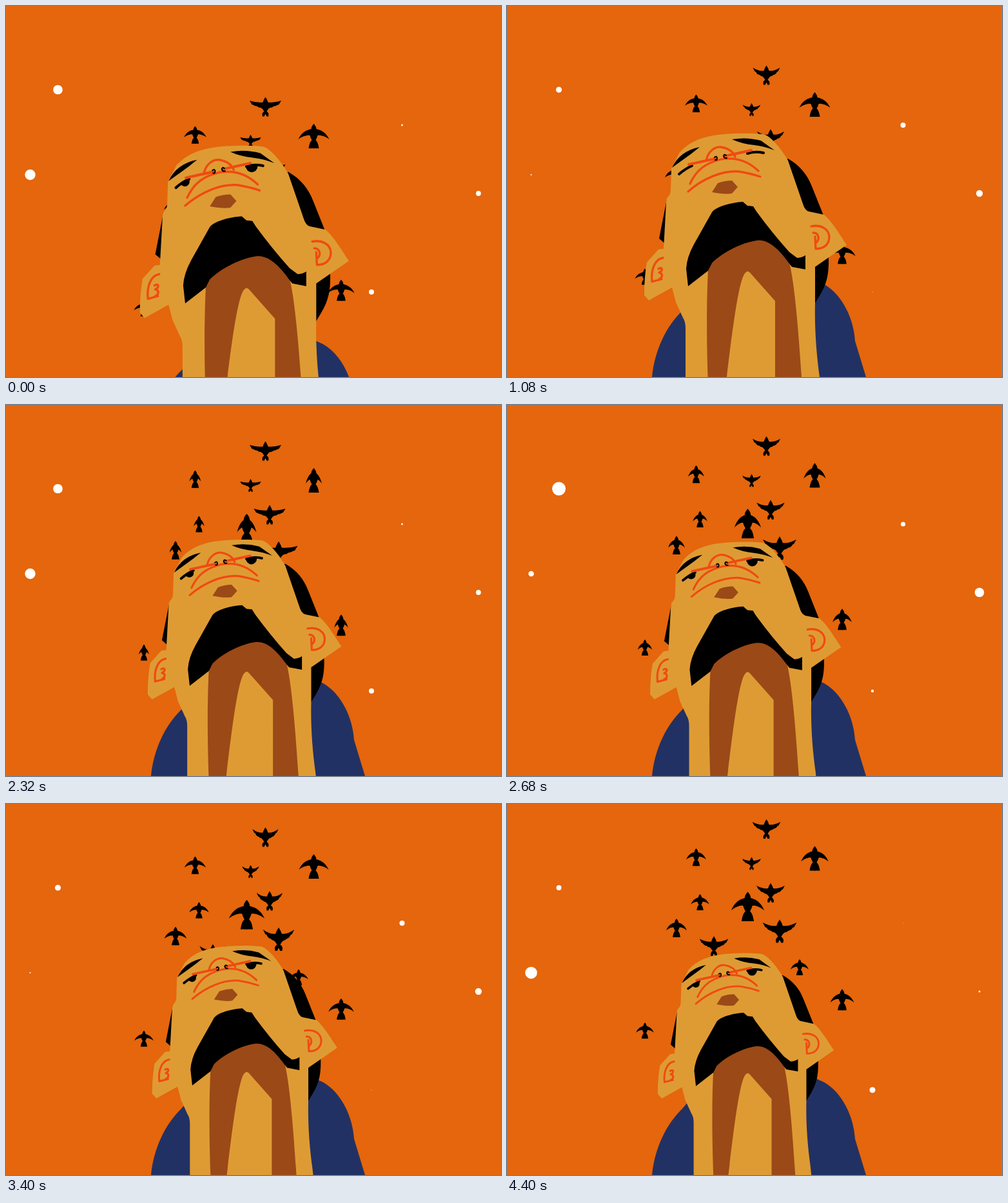
Animation of 768 by 576 pixels, one loop 4440 ms. Source, as an HTML page with a canvas:

```html
<!DOCTYPE html>
<html lang="en">
<head>
<meta charset="utf-8">
<title>Birds above</title>
<style>
html, body { margin: 0; width: 100%; height: 100%; overflow: hidden; background: #e5660c; }
canvas { display: block; }
</style>
</head>
<body>
<canvas id="stage" width="768" height="576"></canvas>
<script>
const ctx = document.getElementById('stage').getContext('2d');
const LOOP = 4440, STEP = 40;
const SKIN = '#de9b34', SHADE = '#9b4917', RED = '#f04a10', NAVY = '#223163';

// x, y, mean radius, swing, time of the largest size
const stars = [
  [80.5, 130, 5.4, 5.2, 440], [37.5, 262, 4.9, 4.4, 2050], [614.5, 185, 2.5, 2.3, 760],
  [733, 291, 4.1, 4, 600], [567, 444, 2.4, 2.1, 2070]
];

// kind, x, starting top, scale, climb rate
const birds = [
  ['hawk', 402.5, 141.5, 1, 1], ['hawk', 379.5, 200, .66, 1], ['hawk', 409, 240.5, 1, 1],
  ['hawk', 423, 297, 1.2, 1], ['hawk', 321, 323, 1.02, 1],
  ['swift', 293.5, 186.5, .72, 1], ['swift', 477.5, 183, 1, 1], ['swift', 373.5, 254, 1.2, 1],
  ['swift', 263, 298, .75, 1.02], ['swift', 299.5, 257.5, .66, 1],
  ['swift', 214, 457, .65, 1], ['swift', 520, 425, .86, 1.17], ['swift', 454, 388, .65, 1.25]
];

// Wing beats counted at a few moments
const beatTimes = [0, 1080, 1760, 2320, 3000, 3840, 4400];
const beats = {
  swift: [-.11, 2.89, 4.87, 6.5, 8, 10.4, 11.81],
  hawk: [.08, 3.27, 5.23, 6.92, 8.5, 11, 12.23]
};

// Right half of each bird, for half wingspan w
const halfBird = {
  swift: w => `M-1 2L0 0C2 2 4 5 4 8C${.42 * w} 9 ${.8 * w} 13 ${w} 24
    C${.75 * w} 19 ${.4 * w} 17 6 18Q5 22 3 25C6 28 7 32 8 38H-1Z`,
  hawk: w => {
    const tip = 1 + (w - 18) * .7;
    return `M-1 2L0 0L2.5 4L4 8Q${.55 * w} 9 ${w} ${tip}L${.85 * w} ${tip + 6}
      L${.78 * w} ${tip + 6.5}Q${.68 * w} 14 ${.5 * w} 14.5L${.42 * w} 16Q6 16 4 19L2 22
      Q5 24 5 27L4.5 30H2L0 26H-1Z`;
  }
};

const body = new Path2D(`M225 576C229 535 247 497 272 473L300 440L470 422L492 432
  C520 448 538 485 540 520L557 576V700H225Z`);
const hair = new Path2D(`M436 237C455 248 466 262 473 280L491 325L499 390
  C500 425 493 438 477 463L430 420V240Z M248 300L236 361L244 368L260 330Z`);
const skin = new Path2D(`M255 252L268 227C282 212 298 205 320 201C345 197 375 197 398 199
  C410 202 428 225 436 240L459 307Q462 317 468 319L492 324C505 335 518 358 527 371L478 405
  V462C477 500 480 540 485 576L497 690H277V500Q277 490 273 484L262 460L256 437L220 457L213 449
  C213 425 215 410 217 398L235 378L243 377L247 305Q247 299 250 296Q254 292 254 285Z`);
const shade = new Path2D(`M312 410L318 390L390 345L415 360L438 398C446 430 452 500 457 576L465 690H416V458
  L377 414Q373 410 370 414C360 422 350 500 341 576L327 690H317C309 560 309 470 312 410Z
  M318 289L327 275Q338 271 349 271L358 281L349 291Q338 293 318 289Z`);
const beard = new Path2D(`M281 435L278 408Q279 390 290 370L317 322C322 311 350 305 366 304
  L373 310L382 311L387 319Q412 353 438 382L450 391Q457 391 463 387V409L442 405L438 400
  C425 382 408 362 388 364C365 367 335 382 318 399L312 411Z`);
const brows = new Path2D(`M256 251Q268 225 299 219Q287 229 274 238Z
  M349 207Q372 203 394 209L415 224Q400 218 384 216Q364 214 349 207Z`);
const lids = new Path2D('M267 261Q276 253 287 248M373 229Q385 225 398 228');
const nostrils = new Path2D('M323 239Q326 240 326 236Q325 232 322 235M341 236Q337 237 336 233Q337 229 340 232');
const lines = new Path2D(`M309 240C312 225 323 218 332 219C344 221 351 227 354 234
  M284 276C294 254 308 244 332 238Q365 232 390 256
  M281 288C305 267 335 255 360 257Q378 260 393 265
  M472 342C487 339 499 346 500 358C500 371 491 377 479 377L478 358
  M475 352C483 352 486 361 480 367
  M242 391C229 393 223 410 225 428L240 424M235 408C242 404 242 411 236 414C242 415 242 421 236 424`);
const bridge = new Path2D('M282 246L323 237M338 233L379 224');

function fill(path, color) {
  ctx.fillStyle = color;
  ctx.fill(path);
}

function stroke(path, color, width) {
  ctx.strokeStyle = color;
  ctx.lineWidth = width;
  ctx.stroke(path);
}

function beatAt(list, t) {
  let i = 0;
  while (i < list.length - 2 && t > beatTimes[i + 1]) i++;
  const part = (t - beatTimes[i]) / (beatTimes[i + 1] - beatTimes[i]);
  return Math.cos(2 * Math.PI * (list[i] + part * (list[i + 1] - list[i])));
}

function drawStars(t) {
  for (const [x, y, mean, swing, peak] of stars) {
    const r = mean + swing * Math.cos(2 * Math.PI * (t - peak) / 2320);
    const dot = new Path2D();
    dot.arc(x, y, Math.max(0, r), 0, 7);
    fill(dot, '#fff');
  }
}

function drawBirds(t) {
  const climb = 144 * (1 - Math.exp(-t / 2600));
  const half = {
    swift: new Path2D(halfBird.swift(19 + 6.5 * beatAt(beats.swift, t))),
    hawk: new Path2D(halfBird.hawk(21.5 + 3.5 * beatAt(beats.hawk, t)))
  };
  for (const [kind, x, top, size, rate] of birds) {
    ctx.save();
    ctx.translate(x, top - climb * rate);
    ctx.scale(size, size);
    fill(half[kind], '#000');
    ctx.scale(-1, 1);
    fill(half[kind], '#000');
    ctx.restore();
  }
}

function drawEyes(t) {
  const open = Math.min(1, Math.abs(t - 1080) / 140);
  for (const [x, y, r, tilt] of [[280, 251, 7.5, -.5], [381, 228, 9, 0]]) {
    const pupil = new Path2D();
    pupil.ellipse(x, y, r, r * 1.1 * open, tilt, 0, Math.PI);
    fill(pupil, '#000');
  }
  stroke(lids, '#000', 4);
}

function drawMan(t) {
  const rise = Math.max(0, 1 - t / 1000) ** 3;
  const u = (t - 1080) / 3320;
  const size = 1 - .13 * (.82 * u + .18 * u * u);

  ctx.save();
  ctx.translate(0, 93 * rise);
  fill(body, NAVY);
  ctx.restore();

  ctx.save();
  ctx.translate(374, 458 + 27.5 * rise);
  ctx.scale(size, size);
  ctx.translate(-374, -458);
  fill(hair, '#000');
  fill(skin, SKIN);
  fill(shade, SHADE);
  fill(beard, '#000');
  fill(brows, '#000');
  drawEyes(t);
  stroke(lines, RED, 3.3);
  stroke(bridge, RED, 4);
  stroke(nostrils, '#000', 2);
  ctx.restore();
}

function draw(now) {
  const t = Math.floor(now % LOOP / STEP) * STEP;
  ctx.fillStyle = '#e5660c';
  ctx.fillRect(0, 0, 768, 576);
  drawStars(t);
  drawBirds(t);
  drawMan(t);
}

ctx.lineCap = ctx.lineJoin = 'round';
const start = performance.now();
function tick() {
  draw(performance.now() - start);
  requestAnimationFrame(tick);
}
tick();
</script>
</body>
</html>
```
